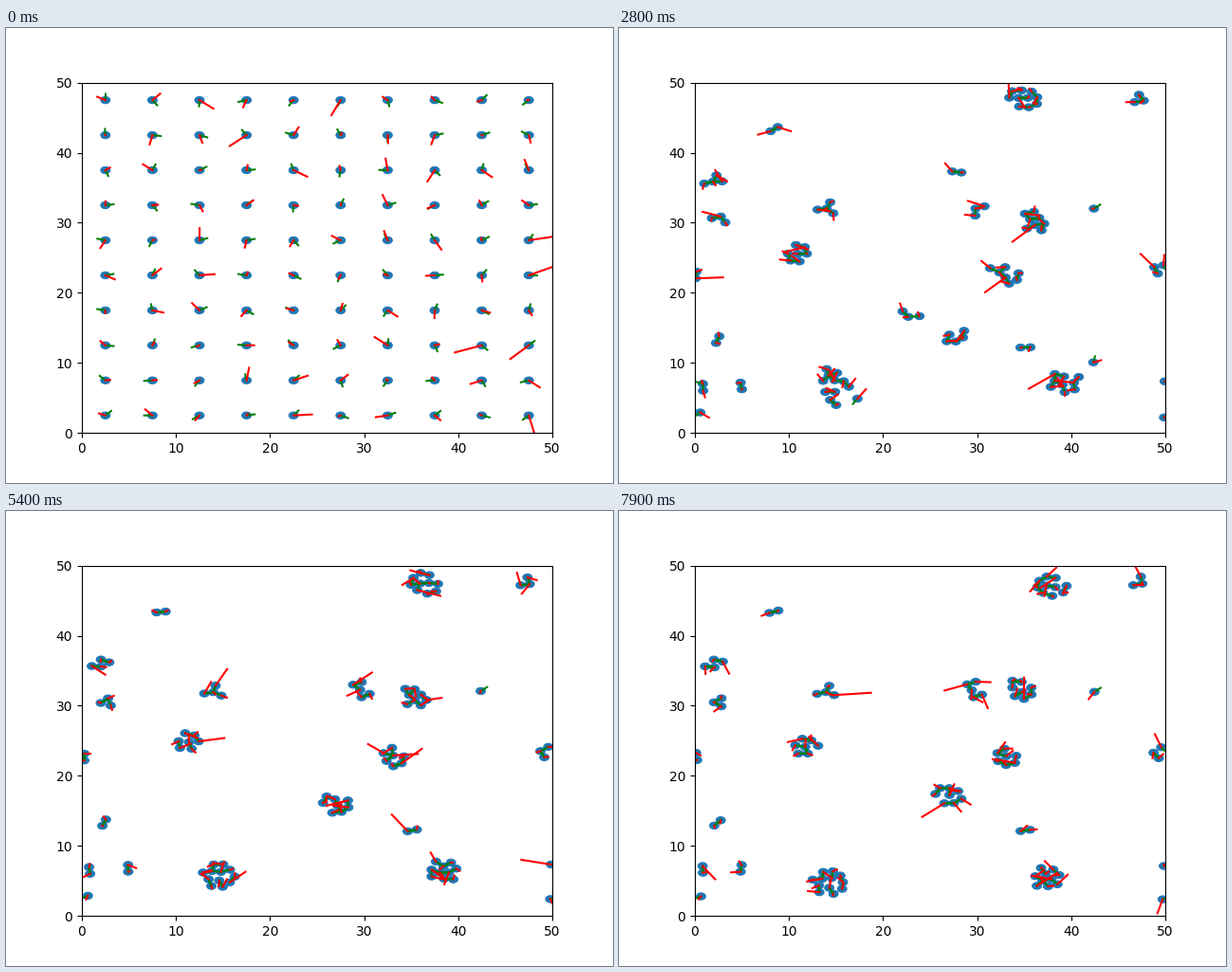
A matplotlib script for the animation above (8000 ms loop, 640 by 480 pixels).

```python
import numpy as np
import matplotlib.pyplot as plt
from matplotlib.animation import FuncAnimation
from matplotlib.collections import EllipseCollection, LineCollection

BOX, STEPS = 50, 80
SETTLED = 28      # step by which the clusters have formed
CONTACT = 0.97    # spacing of touching particles

# large clusters drift: size, centre, total drift
DRIFTING = np.array([
    (10, 35, 47.8, 3, -0.8),
    (7, 10.9, 25.6, 0.9, -1.5),
    (12, 14.9, 6.7, -0.7, -2),
    (8, 36.1, 30.2, -1.5, 2.2),
    (8, 27.1, 14.6, -0.1, 2.8),
    (10, 39.4, 7.4, -2.1, -2.1),
])
# small ones stay put: size, centre
RESTING = np.array([
    (4, 2, 36), (3, 2.6, 30.5), (5, 49.6, 23.1), (2, 2.4, 13.3),
    (3, 0.5, 6.8), (2, 50.2, 2.6), (2, 4.9, 6.8), (2, 8.4, 43.4),
    (3, 47.2, 47.7), (4, 14, 32), (5, 29.7, 32.3), (1, 42.4, 32),
    (7, 33.1, 22.6), (2, 35.1, 12.2),
])
sizes = np.r_[DRIFTING[:, 0], RESTING[:, 0]].astype(int)
homes = np.r_[DRIFTING[:, 1:3], RESTING[:, 1:]]
drifts = np.r_[DRIFTING[:, 3:], np.zeros((len(RESTING), 2))]


def wrap(d):
    return (d + BOX / 2) % BOX - BOX / 2


def centres(k):
    return homes + drifts * np.clip((k - SETTLED) / (STEPS - SETTLED), 0, 1)


def gaps(pos):
    """Vectors from every particle to every other, and their lengths."""
    d = wrap(pos[None] - pos[:, None])
    r = np.hypot(d[..., 0], d[..., 1])
    np.fill_diagonal(r, np.inf)
    return d, np.maximum(r, 1e-6)


def assign(pos):
    """Share particles among clusters, swapping pairs while it shortens the way."""
    label = np.repeat(np.arange(len(sizes)), sizes)
    cost = (wrap(pos[:, None] - homes[None]) ** 2).sum(-1)
    for _ in range(1000):
        c = cost[:, label]
        own = np.diag(c)
        gain = c + c.T - own[:, None] - own[None]
        i, j = np.unravel_index(gain.argmin(), gain.shape)
        if gain[i, j] > -1e-9:
            break
        label[i], label[j] = label[j], label[i]
    return label


def polar(r, angle):
    return np.stack([r * np.cos(angle), r * np.sin(angle)], -1)


def simulate():
    rng = np.random.default_rng(11)
    side = np.arange(2.5, BOX, 5)
    pos = np.stack(np.meshgrid(side, side), -1).reshape(-1, 2)
    n = len(pos)
    row = np.arange(n)
    label = assign(pos)
    mates = label[:, None] == label[None]
    core = 0.5 * np.sqrt(sizes)[label]
    angle = rng.uniform(0, 2 * np.pi, n)
    angle[sizes[label] == 1] = 0.7
    free = polar(1, angle)

    states = []
    for k in range(STEPS):
        kick = polar(rng.gamma(2, 0.52, n), rng.uniform(0, 2 * np.pi, n))
        d, r = gaps(pos)
        near = r.argmin(1)
        rn = r[row, near][:, None]
        head = np.where(rn < 1.4, d[row, near] / rn, free)
        states.append((pos % BOX, head * 0.88, kick))

        # fall towards the cluster centre, faster when closer
        goal = centres(k + 1)[label]
        to = wrap(goal - pos)
        dist = np.maximum(np.hypot(*to.T), 1e-6)
        speed = np.minimum(np.clip(dist - core, 0, 0.45), 1.4 / dist)
        move = to * (speed / dist)[:, None]

        # close up to the nearest mate
        rm = np.where(mates, r, np.inf)
        mate = rm.argmin(1)
        rm = rm[row, mate]
        pull = np.where(np.isfinite(rm), np.clip((rm - CONTACT) / 2, 0, 0.12), 0)
        move += d[row, mate] * (pull / np.minimum(rm, BOX))[:, None]
        pos = pos + move + 0.04 * kick

        # carry formed clusters along with their centres
        if k > SETTLED - 8:
            err = wrap(goal - pos)
            mean = np.stack([np.bincount(label, e) for e in err.T], -1) / sizes[:, None]
            pos += np.clip(0.3 * mean, -0.15, 0.15)[label]

        # push overlapping particles apart
        for _ in range(5):
            d, r = gaps(pos)
            push = np.clip(CONTACT - r, 0, None) * 0.4 / r
            pos = pos - (d * push[..., None]).sum(1)
    return states


states = simulate()

fig, ax = plt.subplots(figsize=(6.4, 4.8), dpi=100)
ax.set(xlim=(0, BOX), ylim=(0, BOX))

ones = np.ones(sizes.sum())
discs = EllipseCollection(ones, ones, 0 * ones, units="xy", offsets=states[0][0],
                          offset_transform=ax.transData, facecolors="C0",
                          edgecolors="C0", linewidths=0.7, zorder=1)
greens = LineCollection([], colors="g", linewidths=1.5, capstyle="projecting", zorder=2)
reds = LineCollection([], colors="r", linewidths=1.5, capstyle="projecting", zorder=2)
for artist in (discs, greens, reds):
    ax.add_collection(artist, autolim=False)


def draw(k):
    pos, head, kick = states[k]
    discs.set_offsets(pos)
    greens.set_segments(np.stack([pos, pos + head], 1))
    reds.set_segments(np.stack([pos, pos + kick], 1))
    return discs, greens, reds


anim = FuncAnimation(fig, draw, frames=STEPS, interval=100, repeat=True, repeat_delay=0)
plt.show()
```
